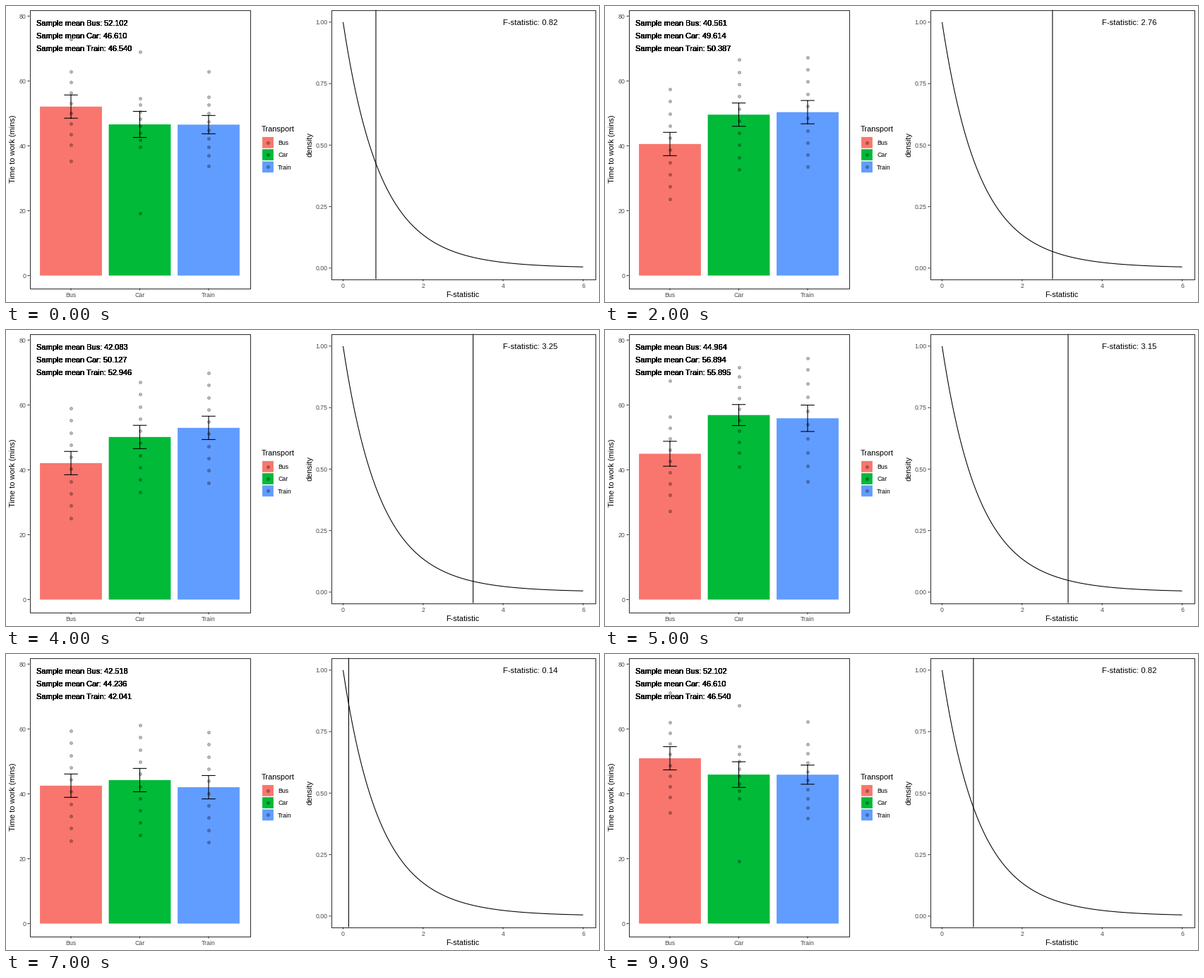
Animation, 840 px wide and 420 px high, one loop 10 s. Source, as a matplotlib script:

```python
import numpy as np
import matplotlib.pyplot as plt
from matplotlib.animation import FuncAnimation
from matplotlib.patches import Rectangle

W, H, DPI = 840, 420, 100
PT = 72 / DPI
GRAY, TICK = "#333333", "#4d4d4d"
NAMES = ["Bus", "Car", "Train"]
COLORS = ["#F8766D", "#00BA38", "#619CFF"]
N = 10

plt.rcParams["font.family"] = "Liberation Sans"
rng = np.random.default_rng(4)

# F-statistic, then mean, standard error, highest and lowest value per group
SAMPLES = [
    (0.82, (52.102, 3.58, 72.9, 35.3), (46.610, 4.02, 69.1, 19.2),
           (46.540, 2.82, 62.9, 33.8)),
    (0.59, (51.329, 3.69, 66.0, 32.3), (48.918, 3.42, 60.1, 24.1),
           (45.624, 4.02, 71.2, 31.9)),
    (2.76, (40.561,), (49.614,), (50.387,)),
    (3.36, (40.548, 2.06, 49.4, 31.7), (45.999, 2.88, 67.4, 36.7),
           (50.432, 3.07, 70.0, 38.6)),
    (3.25, (42.083,), (50.127,), (52.946,)),
    (3.15, (44.964, 3.84, 67.5, 27.3), (56.894, 3.24, 71.6, 40.9),
           (55.895, 4.07, 74.4, 36.3)),
    (5.14, (46.603, 4.46, 68.3, 27.8), (48.319, 3.26, 68.1, 34.3),
           (33.780, 2.48, 47.8, 24.7)),
    (0.14, (42.518,), (44.236,), (42.041,)),
    (1.07, (36.804, 3.26, 53.1, 22.9), (38.747, 3.06, 53.0, 23.4),
           (42.796, 2.50, 56.1, 30.3)),
    (0.60, (45.274,), (42.581, 3.6, 57.7, 19.0), (42.763,)),
]


def group_values(mean, err, *ends):
    """Ten values with this mean and error, evenly spread between the ends."""
    n = N - len(ends)
    center = (N * mean - sum(ends)) / n
    rest = (N * (N - 1) * err ** 2 - sum((v - mean) ** 2 for v in ends)
            - n * (center - mean) ** 2)
    offsets = np.arange(n) - (n - 1) / 2
    step = np.sqrt(max(rest, 0) / np.sum(offsets ** 2))
    return np.sort(np.concatenate([ends, center + step * offsets]))


f_stat = np.array([s[0] for s in SAMPLES])
groups = [[g if len(g) > 1 else (*g, 3.6) for g in s[1:]] for s in SAMPLES]
means = np.array([[g[0] for g in s] for s in groups])
errors = np.array([[g[1] for g in s] for s in groups])
values = np.array([[group_values(*g) for g in s] for s in groups])
for sample in values[1:-1]:
    for group in sample:
        rng.shuffle(group)


# Scales of the two panels, in pixels
def group_x(i):
    return 92 + 97.5 * i


def time_y(v):
    return 382.5 - 4.602 * v


def stat_x(v):
    return 477.5 + 56.67 * v


def dens_y(v):
    return 371.9 - 349 * v


fig = plt.figure(figsize=(W / DPI, H / DPI), dpi=DPI, facecolor="white")
ax = fig.add_axes([0, 0, 1, 1])
ax.set_xlim(0, W)
ax.set_ylim(H, 0)
ax.axis("off")


def label(x, y, s, size=8.8, color="black", ha="left", z=6):
    return ax.text(x, y + 0.36 * size, s, fontsize=size * PT, color=color,
                   ha=ha, va="baseline", zorder=z)


def side_label(x, y, s):
    ax.text(x, y, s, fontsize=11 * PT, rotation=90, rotation_mode="anchor",
            ha="center", va="baseline")


def line(xs, ys, color="black", z=4, snap=False):
    return ax.plot(xs, ys, color=color, lw=1.07 * PT, zorder=z, snap=snap,
                   solid_capstyle="butt")[0]


def dots(xs, ys):
    return ax.scatter(xs, ys, s=(3.92 * PT) ** 2, facecolors=(0, 0, 0, 0.25),
                      edgecolors=(0, 0, 0, 0.3), linewidths=0.94 * PT,
                      zorder=3)


def box(x, y, w, h, color):
    return ax.add_patch(Rectangle((x, y), w, h, fc=color, lw=0, zorder=2,
                                  snap=False))


def panel(x0, y0, x1, y1, xticks, yticks):
    line([x0, x1, x1, x0, x0], [y0, y0, y1, y1, y0], GRAY, 5, True)
    for x, s in xticks:
        line([x, x], [y1, y1 + 3], GRAY, 5)
        label(x, y1 + 9.3, s, color=TICK, ha="center")
    for y, s in yticks:
        line([x0 - 3, x0], [y, y], GRAY, 5)
        label(x0 - 5, y, s, color=TICK, ha="right")


panel(33.5, 5.5, 345.5, 400.5,
      [(group_x(i), s) for i, s in enumerate(NAMES)],
      [(time_y(v), str(v)) for v in range(0, 81, 20)])
panel(460.5, 5.5, 834.5, 387.5,
      [(stat_x(v), str(v)) for v in range(0, 7, 2)],
      [(dens_y(v), f"{v:.2f}") for v in np.arange(0, 1.1, 0.25)])
side_label(13, 203, "Time to work (mins)")
side_label(433, 196.5, "density")
label(647, 409, "F-statistic", 11, ha="center")

label(362, 174, "Transport", 11)
for i, (name, color) in enumerate(zip(NAMES, COLORS)):
    y = 193.8 + 17.28 * i
    box(363.1, y - 7.9, 15.8, 15.8, color)
    dots([371], [y])
    label(385, y, name)

# F density with 2 and 27 degrees of freedom
fx = np.linspace(0, 6, 101)
line(stat_x(fx), dens_y((1 + 2 * fx / 27) ** -14.5))

bars = [box(group_x(i) - 43.9, 0, 87.8, 0, c) for i, c in enumerate(COLORS)]
whiskers = [line([], []) for _ in NAMES]
points = dots(np.zeros(3 * N), np.zeros(3 * N))
point_x = np.repeat(group_x(np.arange(3)), N)
# Stacked copies give the heavier look of overplotted labels
mean_text = [[label(43.2, time_y(78 - 4 * i), "", 11) for _ in range(8)]
             for i in range(3)]
stat_line = line([0, 0], [5.5, 387.5])
stat_text = label(stat_x(4), dens_y(1), "", 11.38)


def update(frame):
    a, r = divmod(frame, 10)
    b = (a + 1) % len(SAMPLES)
    hold, steps = (3, 7) if a == 0 else (4, 6)
    p = max(0, r - hold) / steps
    shown = a if p < 0.5 else b

    def mix(data):
        return data[a] + (data[b] - data[a]) * p

    for i, (m, e) in enumerate(zip(mix(means), mix(errors))):
        x, base, top = group_x(i), time_y(0), time_y(m)
        bars[i].set_y(top)
        bars[i].set_height(base - top)
        lo, hi = time_y(m - e), time_y(m + e)
        whiskers[i].set_data(
            [x - 9.75, x + 9.75, np.nan, x, x, np.nan, x - 9.75, x + 9.75],
            [hi, hi, np.nan, hi, lo, np.nan, lo, lo])
        for t in mean_text[i]:
            t.set_text(f"Sample mean {NAMES[i]}: {means[shown, i]:.3f}")
    points.set_offsets(np.column_stack([point_x, time_y(mix(values).ravel())]))
    stat_line.set_xdata([stat_x(mix(f_stat))] * 2)
    stat_text.set_text(f"F-statistic: {f_stat[shown]:.2f}")
    return bars + whiskers + [points, stat_line, stat_text]


anim = FuncAnimation(fig, update, frames=100, interval=100, repeat=True,
                     repeat_delay=0, blit=False)
plt.show()
```
